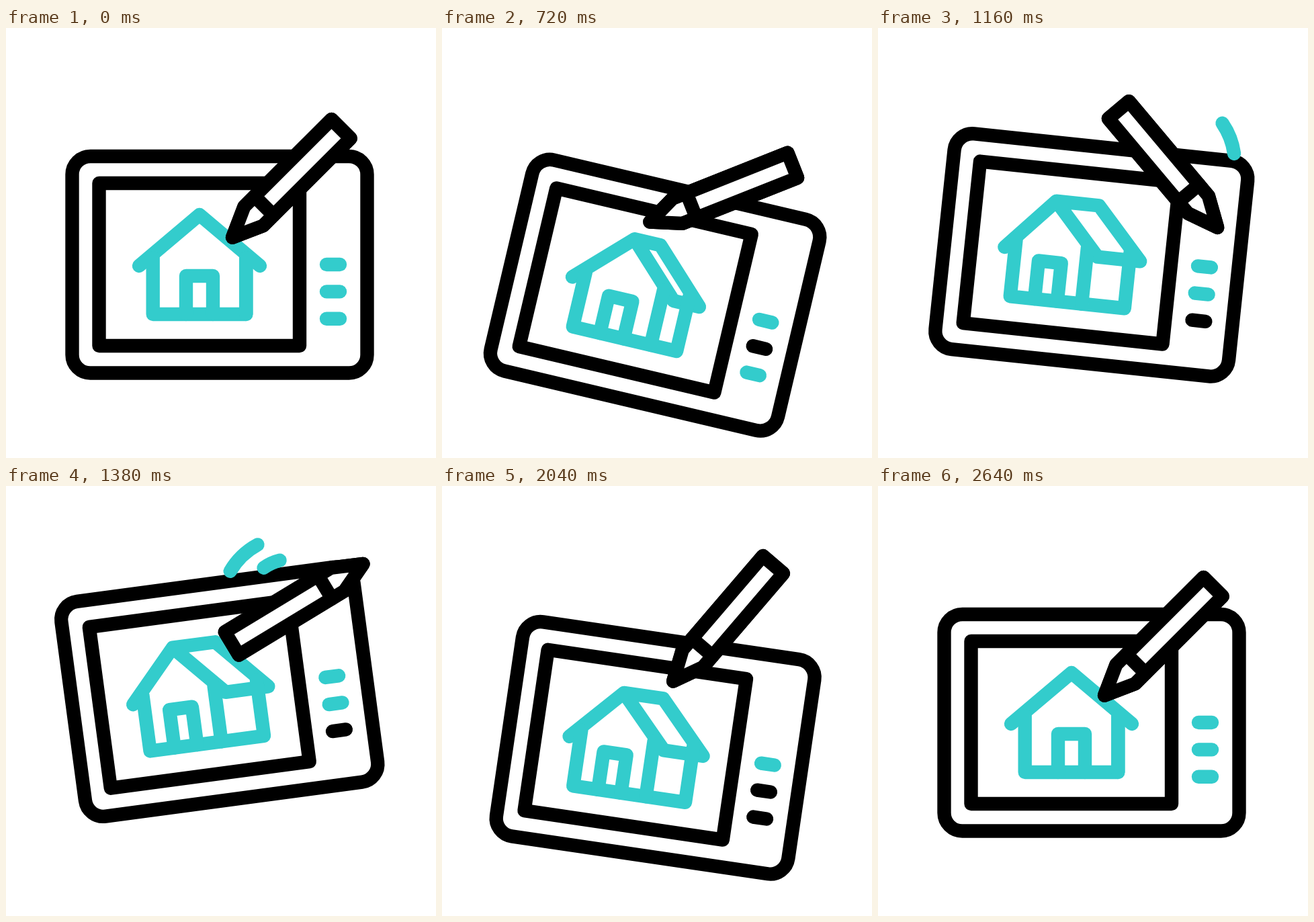
An HTML page with a canvas that plays this animation: 640 by 640 pixels, repeating every 3000 ms.

```html
<!DOCTYPE html>
<html>
<head>
<meta charset="utf-8">
<style>
  html, body { margin: 0; height: 100%; overflow: hidden; background: #fff; }
  canvas { display: block; width: 100vw; height: 100vh; }
</style>
</head>
<body>
<canvas id="stage" width="640" height="640"></canvas>
<script>
const ctx = document.getElementById('stage').getContext('2d');
const TEAL = '#33cccc', BLACK = '#000';
const LOOP = 3000, END = 2640, RAD = Math.PI / 180;

const mix = (a, b, p) => a + (b - a) * p;
const span = (t, start, end) => Math.min(1, Math.max(0, (t - start) / (end - start)));
const ease = (t, start, end) => {
  const x = span(t, start, end);
  return x * x * (3 - 2 * x);
};

// Each motion is a sum of eased moves that follow one another.
const tabletTurn = t =>
  16 * ease(t, 205, 905) - 28 * ease(t, 905, 1540) + 21 * ease(t, 1540, 2100) - 9 * ease(t, 2100, END);
const tabletShift = t =>
  40 * ease(t, 220, 785) - 82 * ease(t, 785, 1375) + 76 * ease(t, 1375, 1980) - 34 * ease(t, 1980, END);
const penTurn = t =>
  30 * ease(t, 220, 600) - 405 * ease(t, 600, 2195) + 15 * ease(t, 2195, END);
const penShift = t =>
  23 * ease(t, 220, 580) - 76 * ease(t, 580, 1615) + 53 * ease(t, 1615, 2490);
const houseDepth = t => ease(t, 200, 1100) - ease(t, 1920, END);

// A dark run walks down the buttons, and is one longer on each new pass.
function isDark(button, t) {
  const step = Math.floor((t - 300) / 400), first = step % 3;
  const length = 1 + Math.floor(step / 3);
  return step >= 0 && step < 5 && button >= first && button < first + length;
}

function line(color, points, closed) {
  ctx.beginPath();
  points.forEach(([x, y]) => ctx.lineTo(x, y));
  if (closed) ctx.closePath();
  ctx.strokeStyle = color;
  ctx.stroke();
}

// An upright arch: up the left side, across, down the right side.
const arch = (left, right, top, bottom) =>
  [[left, bottom], [left, top], [right, top], [right, bottom]];

function drawHouse(depth) {
  const x = mix(288, 257.5, depth), half = mix(90, 69.5, depth), side = 64 * depth;
  const wall = 0.77 * half, door = mix(20, 17, depth);
  const top = 278, eaves = 354, wallTop = 342, floor = 426;
  line(TEAL, [[x - half, eaves], [x, top], [x + side, top],
    [x + half + side, eaves], [x + half, eaves], [x, top]]);
  line(TEAL, arch(x - wall, x + wall + side, floor, wallTop));
  line(TEAL, [[x + wall, wallTop], [x + wall, floor]]);
  line(TEAL, arch(x - door, x + door, 369, floor));
}

function drawTablet(t) {
  ctx.save();
  ctx.translate(288, 352 + tabletShift(t));
  ctx.rotate(tabletTurn(t) * RAD);
  ctx.translate(-288, -352);
  ctx.strokeStyle = BLACK;
  ctx.beginPath();
  ctx.roundRect(98.5, 191, 439, 322.5, 27);
  ctx.stroke();
  line(BLACK, arch(138.5, 437, 231, 473), true);
  drawHouse(houseDepth(t));
  for (let i = 0; i < 3; i++) {
    const y = 352 + 40.4 * i;
    line(isDark(i, t) ? BLACK : TEAL, [[477, y], [497, y]]);
  }
  ctx.restore();
}

function drawTrail(radius, from, to, head, tail) {
  if (tail >= 1 || head <= tail) return;
  ctx.beginPath();
  ctx.arc(0, 0, radius, mix(from, to, head) * RAD, mix(from, to, tail) * RAD);
  ctx.strokeStyle = TEAL;
  ctx.stroke();
}

function drawPen(t) {
  const end = 104, band = -58, shoulder = -80, tip = -124.5, half = 20;
  ctx.save();
  ctx.translate(425.1, 223.6 + penShift(t));
  ctx.rotate(penTurn(t) * RAD);
  drawTrail(106, 112, 8, span(t, 764, 1437), span(t, 900, 1678));
  drawTrail(72, 70, -5, span(t, 1162, 1727), span(t, 1080, 2010) ** 2);
  ctx.rotate(-45 * RAD);
  line(BLACK, [[end, -half], [end, half], [shoulder, half], [tip, 0], [shoulder, -half]], true);
  ctx.fillStyle = '#fff';
  ctx.globalCompositeOperation = 'source-over';
  ctx.fill();
  ctx.stroke();
  line(BLACK, [[band, -half], [band, half]]);
  ctx.restore();
}

function draw() {
  const t = performance.now() % LOOP;
  ctx.fillStyle = '#fff';
  ctx.fillRect(0, 0, 640, 640);
  ctx.lineWidth = 20.4;
  ctx.lineCap = ctx.lineJoin = 'round';
  drawTablet(t);
  drawPen(t);
  requestAnimationFrame(draw);
}
draw();
</script>
</body>
</html>
```
